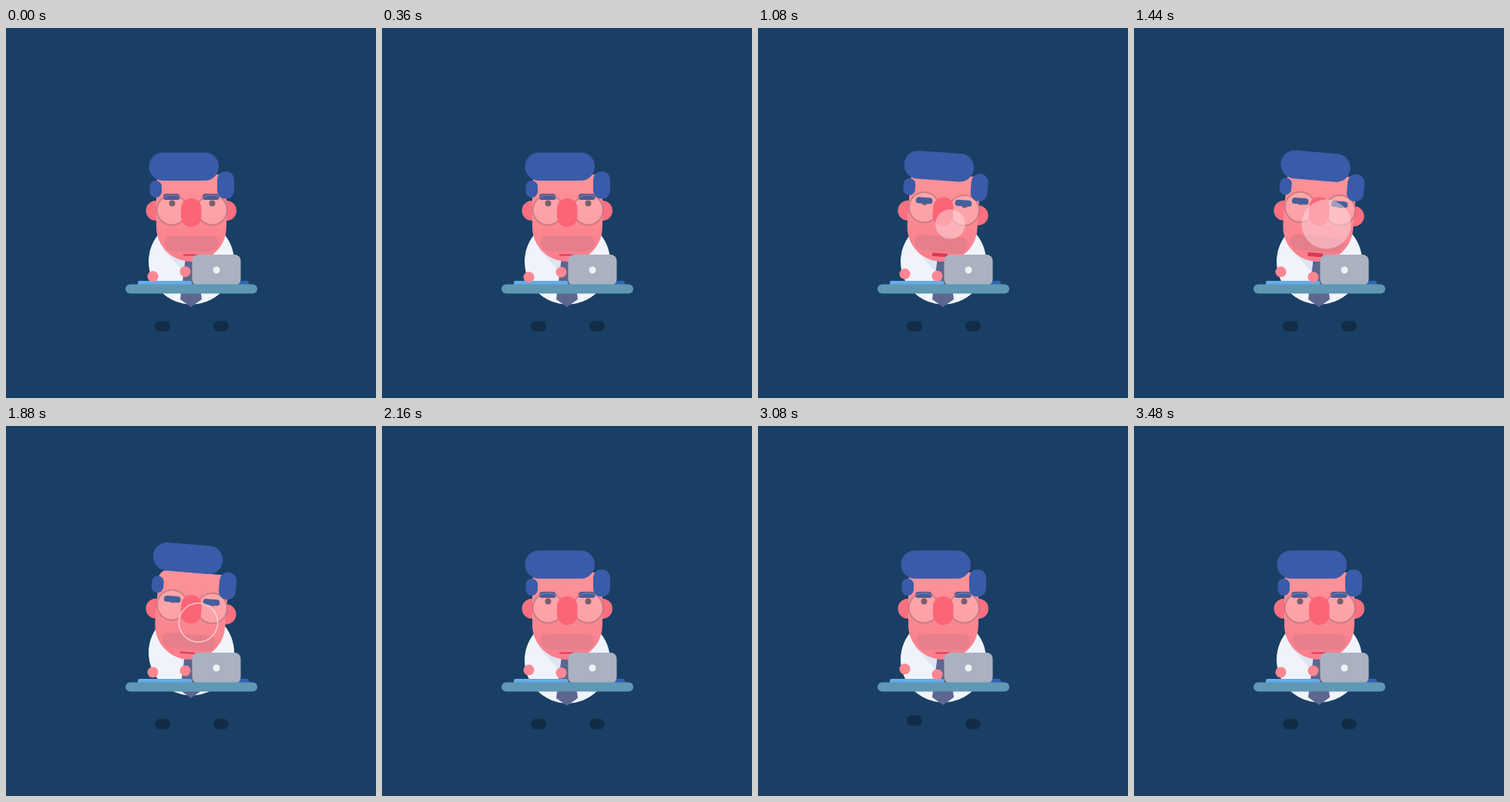
Recreate the animation shown at these times as an HTML page with a canvas. Size 480 by 480 pixels, loop 3520 ms.

```html
<!DOCTYPE html>
<html lang="en">
<head>
<meta charset="utf-8">
<title>Sleepy at the desk</title>
<style>
  html, body { margin: 0; width: 100%; height: 100%; overflow: hidden; background: #193f65; }
  canvas { display: block; }
</style>
</head>
<body>
<canvas id="stage" width="480" height="480"></canvas>
<script>
const ctx = document.getElementById('stage').getContext('2d');
const LOOP = 3520, POP = 1845, TAU = Math.PI * 2;
const HAIR = '#3a5ba8', SKIN = '#fb8792', EAR = '#fa7080', BROW = '#465f9b';

const progress = (t, from, to) => Math.min(1, Math.max(0, (t - from) / (to - from)));
const ease = (t, from, to) => { const p = progress(t, from, to); return p * p * (3 - 2 * p); };
const arch = (t, from, to) => Math.sin(Math.PI * progress(t, from, to));

function box(x, y, w, h, r, fill) {
  ctx.beginPath();
  ctx.roundRect(x, y, w, h, r);
  ctx.fillStyle = fill;
  ctx.fill();
}

function disc(x, y, r, fill, stroke, width) {
  ctx.beginPath();
  ctx.arc(x, y, r, 0, TAU);
  if (fill) { ctx.fillStyle = fill; ctx.fill(); }
  if (stroke) { ctx.strokeStyle = stroke; ctx.lineWidth = width; ctx.stroke(); }
}

function shape(points, fill) {
  ctx.beginPath();
  points.forEach(([x, y]) => ctx.lineTo(x, y));
  ctx.fillStyle = fill;
  ctx.fill();
}

function drawFeet(t) {
  const tap = 6 * arch(t % 704, 127, 324);
  box(193, 380 - tap, 20, 13.5, 6.5, '#122c47');
  box(269, 380, 20, 13.5, 6.5, '#122c47');
}

function drawBody(t) {
  const since = t - POP;
  const jolt = since > 0 && since < 400
    ? -11 * Math.sin(TAU * since / 200) * (1 - since / 400) : 0;
  ctx.save();
  ctx.translate(0, jolt);
  disc(240.5, 303, 55.5, '#f0f4fa');
  shape([[203, 286], [240, 295], [232, 318]], '#dee4f2');
  shape([[233, 298], [247, 298], [254, 352], [240, 362], [226, 352]], '#5c668f');
  ctx.restore();
}

function drawHead(t) {
  const sleep = ease(t, 400, 1300) * (1 - ease(t, 1880, 2080));
  const lid = 7.5 * sleep;
  ctx.save();
  ctx.translate(239.5, 237);
  ctx.rotate(sleep * 4.7 * Math.PI / 180);
  ctx.translate(-239.5, -237);

  for (const x of [194.5, 286]) disc(x, 237 + 3.5 * sleep, 13, EAR);

  const face = ctx.createLinearGradient(0, 198, 0, 303);
  face.addColorStop(0, '#fc9299');
  face.addColorStop(1, '#fa7e8b');
  box(195, 190, 91, 113, [10, 10, 45, 45], face);
  box(206, 270, 69, 20, [10, 10, 16, 16], '#e57f8b');
  const open = 2 + 3 * sleep * (1 - ease(t, 1800, 1870));
  box(230, 294.5 - open / 2, 20, open, 1, '#d93a55');

  // Features drift slightly up as the head tips back.
  const rise = -1.8 * sleep;
  for (const x of [215.3, 267.3]) disc(x, 236 + rise, 19.5, 'rgba(255,215,215,.32)');
  for (const x of [215.5, 267.5]) disc(x, 227.5, 4, '#76616b');
  for (const x of [204, 255]) box(x, 215 + lid, 21.5, 8, [4, 4, 3, 3], BROW);
  for (const x of [215.3, 267.3]) disc(x, 236 + rise, 19.5, null, 'rgba(176,112,116,.6)', 2);
  box(227, 221 + rise, 26.5, 37, 13, '#fb6576');

  box(186.5, 198, 15.5, 22, 7.5, HAIR);
  box(274, 186, 22, 35.5, 10.5, HAIR);
  box(185.5, 161.5 - 21 * arch(t, 1850, 2110), 90.5, 36.5, 18, HAIR);
  ctx.restore();
}

function drawBubble(t) {
  if (t > 640 && t < POP) {
    const r = 32 * Math.pow(progress(t, 640, 1440), .85) - 6 * ease(t, 1480, POP);
    disc(249.5, 254.5, r, 'rgba(255,222,226,.5)');
  } else if (t >= POP && t < 1965) {
    const p = progress(t, POP, 1965);
    disc(249.5, 255, 24 + 4 * p, null, `rgba(255,225,228,${.85 * (1 - p * p)})`, 1.5);
  }
}

function drawDesk(t) {
  const swing = offset => Math.cos(TAU * (t / 320 - offset));
  box(171, 328, 70, 6, 2, '#66abea');
  box(300, 328, 15, 6, 2, '#3263b2');
  disc(190.5, 319.3 + 4 * swing(.12), 7, SKIN);
  disc(232.5, 319.6 - 3.6 * swing(.03), 7, SKIN);
  box(241.5, 294, 63, 40, 8, '#aab1c1');
  disc(273, 314, 4.5, '#eef1f6');
  box(155, 332.5, 171, 12, 6, '#5f97b5');
}

function draw(now) {
  const t = now % LOOP;
  ctx.fillStyle = '#193f65';
  ctx.fillRect(0, 0, 480, 480);
  drawFeet(t);
  drawBody(t);
  drawHead(t);
  drawBubble(t);
  drawDesk(t);
}

const start = performance.now();
function tick() {
  draw(performance.now() - start);
  requestAnimationFrame(tick);
}
tick();
</script>
</body>
</html>
```
